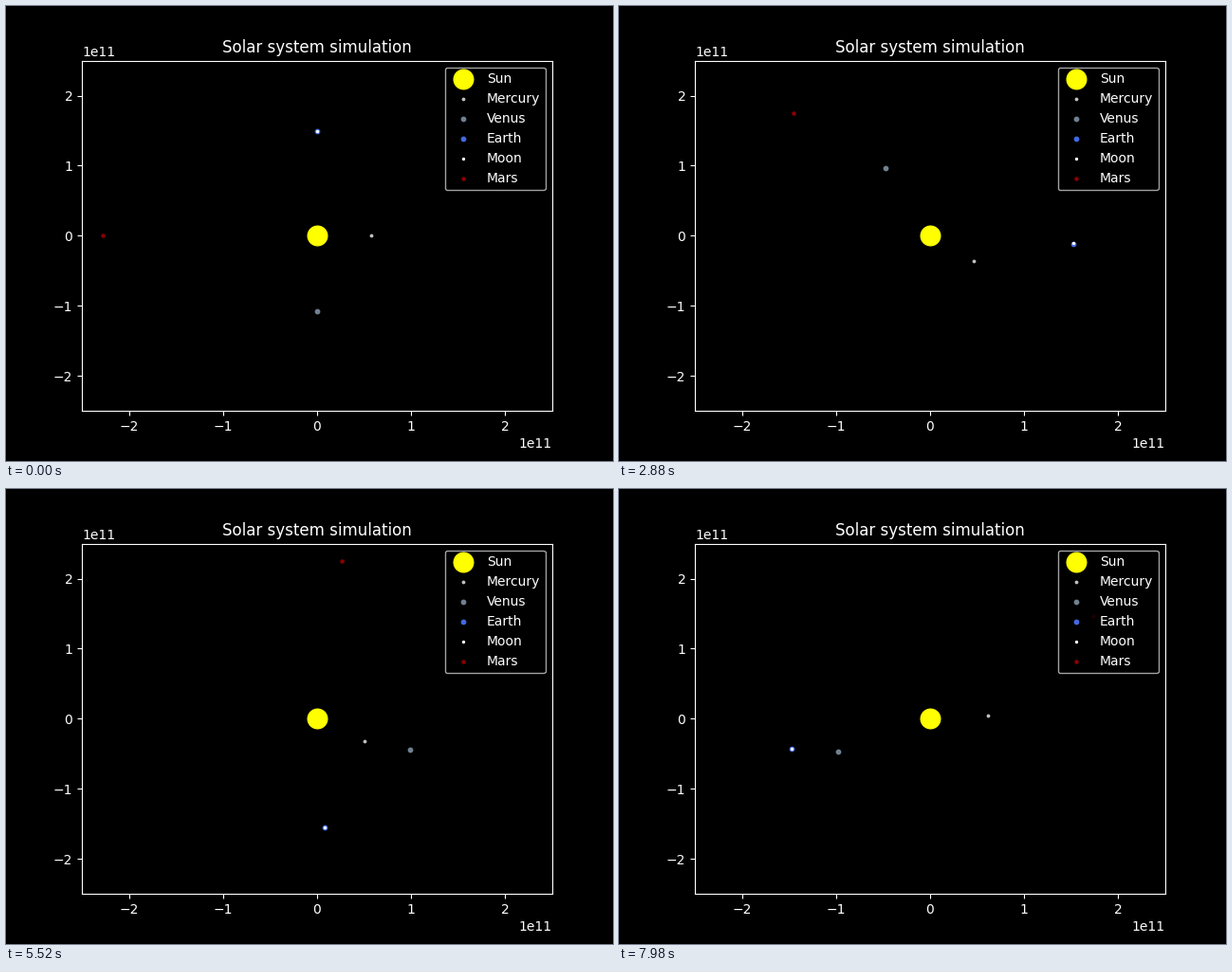
Animation, 640 px wide and 480 px high, one loop 8000 ms. Source, as a matplotlib script:

```python
import numpy as np
import matplotlib.pyplot as plt
from matplotlib.animation import FuncAnimation

G = 6.674e-11
SUN_MASS = 1.9885e30
STEP = 1800                    # seconds per integration step
STEPS_PER_DAY = 48
LOOP_MS, INTERVAL, DAY_MS = 8000, 20, 30
DAYS = 267

# name, colour, marker area, mass, position, velocity
BODIES = [
    ("Mercury", "silver", 3, 3.30e23, (5.791e10, 0), (0, -47370)),
    ("Venus", "slategray", 10, 4.87e24, (0, -1.082e11), (-35000, 0)),
    ("Earth", "royalblue", 10, 5.972e24, (0, 1.496e11), (30000, 0)),
    ("Moon", "white", 2, 7.35e22, (0, 1.496e11 + 3.844e8), (31022, 0)),
    ("Mars", "darkred", 5, 6.42e23, (-2.279e11, 0), (0, 24090)),
]


def acceleration(pos, mass):
    """Pull of the fixed sun plus that of the other bodies."""
    gap = pos[None, :, :] - pos[:, None, :]
    dist2 = (gap ** 2).sum(axis=2)
    np.fill_diagonal(dist2, 1)
    pull = (gap * (mass / dist2 ** 1.5)[:, :, None]).sum(axis=1)
    sun_dist = np.sqrt((pos ** 2).sum(axis=1, keepdims=True))
    return G * (pull - SUN_MASS * pos / sun_dist ** 3)


def simulate():
    """Daily positions from plain Euler steps."""
    mass = np.array([b[3] for b in BODIES])
    pos = np.array([b[4] for b in BODIES], float)
    vel = np.array([b[5] for b in BODIES], float)
    track = [pos]
    for _ in range(DAYS - 1):
        for _ in range(STEPS_PER_DAY):
            acc = acceleration(pos, mass)
            pos = pos + vel * STEP
            vel = vel + acc * STEP
        track.append(pos)
    return np.array(track)


track = simulate()

plt.style.use("dark_background")
fig, ax = plt.subplots(figsize=(6.4, 4.8), dpi=100)
ax.set_xlim(-2.5e11, 2.5e11)
ax.set_ylim(-2.5e11, 2.5e11)
ax.set_title("Solar system simulation")

ax.scatter(0, 0, s=220, color="yellow", label="Sun")
dots = [ax.scatter(*b[4], s=b[2], color=b[1], label=b[0]) for b in BODIES]
ax.legend(loc="upper right")


def update(i):
    day = (i * INTERVAL + INTERVAL // 2) // DAY_MS
    for dot, xy in zip(dots, track[day]):
        dot.set_offsets(xy)
    return dots


anim = FuncAnimation(fig, update, frames=LOOP_MS // INTERVAL,
                     interval=INTERVAL, repeat=True, repeat_delay=0)
plt.show()
```
